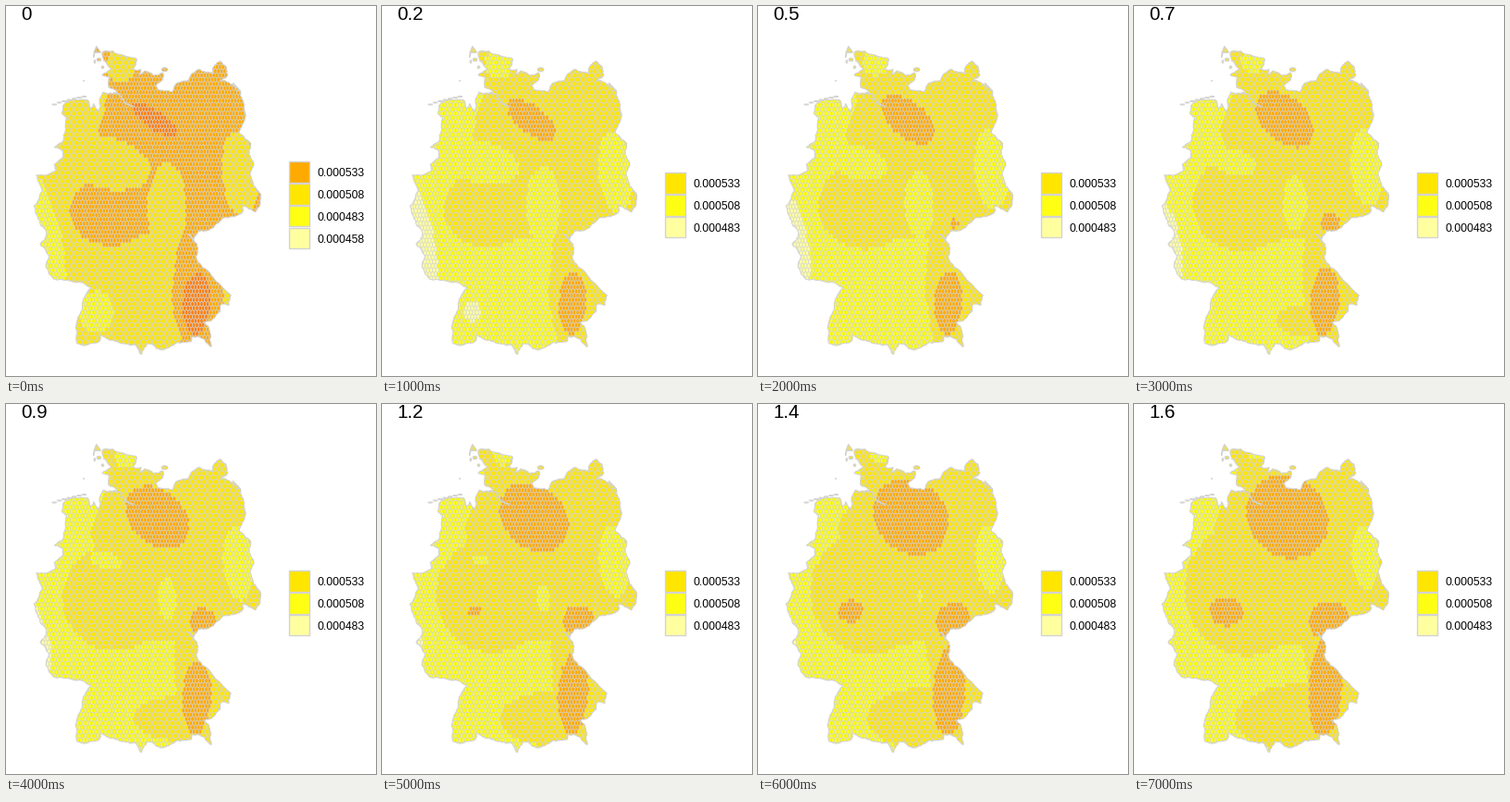
A matplotlib script for the animation above (8000 ms loop, 400x400 px).

```python
import numpy as np
import matplotlib.pyplot as plt
from matplotlib.animation import FuncAnimation
from matplotlib.collections import PolyCollection
from matplotlib.patches import PathPatch, Rectangle
from matplotlib.path import Path

SIZE, DPI, STEPS = 400, 100, 8
PX = 72 / DPI
GRAY = "#d3d3d3"
SHADES = np.array(["#ff7f0e", "#ffaa00", "#ffe600", "#ffff14", "#ffff9f"])
TOP_VALUE, VALUE_STEP = 0.000533, 0.000025
X_DEG, Y_DEG = 26.8, 42.9           # pixels per degree
CELL_W, ROW_H = 3.30, 4.577         # hexagon grid pitch

# Key points of the border of Germany (longitude, latitude), clockwise
COAST_EAST = [
    (8.66, 54.91), (9.44, 54.83), (10.03, 54.72), (9.85, 54.47), (10.2, 54.46),
    (10.14, 54.33), (10.35, 54.43), (10.7, 54.31), (11.08, 54.38), (11.08, 54.2),
    (10.77, 54.06), (10.88, 53.95), (11.45, 53.9), (11.6, 54.1), (12.1, 54.18),
    (12.53, 54.47), (13.1, 54.35), (13.15, 54.55), (13.4, 54.67), (13.6, 54.56),
    (13.7, 54.32), (13.4, 54.18), (13.75, 54.13), (14.2, 53.92),
]
INLAND_EAST = [
    (14.27, 53.72), (14.42, 53.3), (14.15, 52.85), (14.63, 52.59), (14.55, 52.42),
    (14.75, 52.05), (14.6, 51.82), (14.72, 51.56), (15.03, 51.27), (14.82, 50.87),
    (14.3, 51.04), (14.32, 50.9), (13.5, 50.72), (12.95, 50.42), (12.5, 50.38),
    (12.33, 50.19), (12.1, 50.31), (12.5, 49.96), (12.42, 49.75), (13.03, 49.28),
    (13.83, 48.77), (13.74, 48.52), (13.45, 48.56), (13.38, 48.36), (12.75, 48.1),
    (12.97, 47.88), (13.03, 47.47), (12.75, 47.67), (12.25, 47.72),
]
SOUTH_WEST = [
    (12.2, 47.6), (11.63, 47.58), (10.97, 47.4), (10.45, 47.56), (10.2, 47.28),
    (9.95, 47.53), (9.6, 47.54), (8.9, 47.65), (8.56, 47.79), (8.5, 47.6),
    (7.6, 47.57), (7.6, 48.1), (7.85, 48.62), (8.22, 48.97), (7.5, 49.1),
    (6.73, 49.17), (6.37, 49.47), (6.5, 49.75), (6.13, 50.05), (6.39, 50.33),
    (6.02, 50.76), (5.88, 51.03), (6.22, 51.4), (5.97, 51.8), (6.78, 51.92),
    (6.69, 52.07), (7.05, 52.25), (7.05, 52.38), (6.7, 52.5), (7.05, 52.65),
    (7.2, 53.25),
]
NORTH_SEA = [
    (7.0, 53.35), (7.05, 53.55), (7.25, 53.67), (8.05, 53.69), (8.15, 53.46),
    (8.28, 53.6), (8.5, 53.4), (8.52, 53.7), (8.65, 53.89), (9.25, 53.86),
    (8.88, 54.03), (8.92, 54.27), (8.63, 54.32), (9.0, 54.47), (8.65, 54.77),
]
ELBE = [(9.1, 53.88), (9.3, 53.85), (9.58, 53.6), (9.86, 53.54)]
SYLT = [(8.4, 55.05), (8.3, 54.9), (8.28, 54.76), (8.33, 54.88), (8.58, 54.89)]
USEDOM = [(13.9, 54.13), (14.2, 53.93), (14.05, 53.92)]

# Outline of the core class at the start and the end
CORE = np.array([(85, 70), (112, 88), (99, 142), (150, 246), (187, 248),
                 (178, 318), (193, 375), (300, 400), (300, 0), (85, 0)], float)
CORE_END = np.array([(85, 55), (112, 70), (85, 133), (110, 266), (180, 258),
                     (187, 285), (188, 375), (300, 400), (300, 0), (85, 0)], float)


def project(points):
    lon, lat = np.array(points).T
    return np.column_stack([30 + (lon - 5.87) * X_DEG, 43 + (55.06 - lat) * Y_DEG])


def roughen(points, rng, rounds=3):
    """Fractal border: push the middle of every edge sideways."""
    for _ in range(rounds):
        edge = np.roll(points, -1, axis=0) - points
        side = edge[:, ::-1] * (1, -1) * rng.uniform(-0.13, 0.13, (len(points), 1))
        points = np.stack([points, points + edge / 2 + side], axis=1).reshape(-1, 2)
    return points


def closed(points):
    return Path(np.vstack([points, points[:1]]), closed=True)


def islet(lon, lat, rx, ry):
    a = np.linspace(0, 2 * np.pi, 9)[:-1]
    return project(np.column_stack([lon + rx * np.cos(a), lat + ry * np.sin(a)]))


def make_islands():
    frisian = [islet(6.7 + 1.2 * f, 53.58 + 0.2 * f ** 0.8, 0.09, 0.012)
               for f in np.linspace(0, 1, 7)]
    others = [islet(8.5, 54.71, 0.09, 0.04), islet(8.33, 54.66, 0.03, 0.04),
              islet(8.65, 54.52, 0.05, 0.03), islet(11.15, 54.46, 0.13, 0.05),
              islet(7.89, 54.18, 0.02, 0.01)]
    return [project(SYLT), project(USEDOM)] + frisian + others


def hex_grid():
    """Centers anchored at the lower left corner of the map."""
    centers = np.array([(30 + CELL_W * (i + j % 2 / 2), 377 - ROW_H * j)
                        for j in range(-1, 75) for i in range(-1, 77)])
    shape = np.array([(0, -2), (1.5, -1), (1.5, 1), (0, 2), (-1.5, 1), (-1.5, -1)])
    return centers, shape * (CELL_W / 3, ROW_H / 3)


def mix(a, b, f):
    return np.array(a) + (np.array(b) - np.array(a)) * f


def oval(box, size=1.0, tilt=0):
    """Mask of the cells inside an ellipse given as (cx, cy, rx, ry)."""
    cx, cy, rx, ry = box
    if size <= 0:
        return np.zeros(len(centers), bool)
    x, y = (centers - (cx, cy)).T
    a = np.radians(tilt)
    u = x * np.cos(a) + y * np.sin(a)
    v = y * np.cos(a) - x * np.sin(a)
    return (u / rx) ** 2 + (v / ry) ** 2 < size ** 2


def grow(s, start):
    return np.sqrt(max(s - start, 0) / (1 - start))


def shrink(s, end, power=1.0):
    return max(1 - s / end, 0) ** power


def levels(s):
    """Class of every cell at progress s: 0 peak, 1 core, 2 base, 3 pale."""
    core = Path(mix(CORE, CORE_END, s)).contains_points(centers)
    core |= oval(mix((113, 222, 44, 37), (122, 200, 67, 72), s))
    core |= oval((185, 340, 75, 38), grow(s, 0.3))

    gap = oval((108, 169, 50, 28), shrink(s, 0.95, 1.2), 15)
    gap |= oval(mix((174, 218, 21, 48), (175, 207, 21, 48), s), shrink(s, 0.95, 0.8))
    gap |= oval(mix((253, 182, 19, 47), (250, 165, 15, 35), s), tilt=-5)
    gap |= oval(mix((125, 64, 16, 18), (133, 53, 9, 7), s))
    gap |= oval((246, 315, 11, 16), shrink(s, 0.1))

    pale = oval(mix((32, 244, 26, 82), (34, 256, 26, 82), s), shrink(s, 1.1), -15)
    pale |= oval((98, 330, 19, 22), shrink(s, 0.3))

    peak = oval(mix((161, 123, 29, 10), (166, 122, 47, 42), s), tilt=mix(36, 50, s))
    peak |= oval(mix((206, 322, 15, 33), (207, 305, 18, 55), s * s), tilt=3)
    peak |= oval((212, 235, 22, 22), grow(s, 0.25))
    peak |= oval((100, 224, 18, 16), grow(s, 0.66))

    level = np.full(len(centers), 2)
    level[core & ~gap] = 1
    level[pale] = 3
    level[peak] = 0
    return level


fig = plt.figure(figsize=(SIZE / DPI, SIZE / DPI), dpi=DPI, facecolor="white")
plt.rcParams["font.family"] = "Liberation Sans"
ax = fig.add_axes([0, 0, 1, 1])
ax.set(xlim=(0, SIZE), ylim=(SIZE, 0))
ax.axis("off")

rng = np.random.default_rng(4)
border = project(COAST_EAST + INLAND_EAST + SOUTH_WEST + NORTH_SEA)
land = Path.make_compound_path(closed(roughen(border, rng)),
                               *[closed(p) for p in make_islands()])

centers, shape = hex_grid()
cells = PolyCollection(centers[:, None] + shape, edgecolors=GRAY, linewidths=0.6 * PX)
ax.add_collection(cells)
cells.set_clip_path(land, ax.transData)
ax.add_patch(PathPatch(land, fill=False, ec=GRAY, lw=1.1 * PX))
ax.plot(*project(ELBE).T, color=GRAY, lw=1.6 * PX)

title = ax.text(16, 15.3, "", fontsize=20.5 * PX, va="baseline")
keys = [ax.add_patch(Rectangle((305.5, 0), 22.4, 22.4, ec=GRAY, lw=1.4 * PX))
        for _ in range(4)]
names = [ax.text(336.5, 0, f"{TOP_VALUE - i * VALUE_STEP:.6f}", fontsize=12.2 * PX,
                 va="baseline") for i in range(4)]


def draw(step):
    first = min(step, 1)  # the scale moves one shade up after the first step
    cells.set_facecolor(SHADES[levels(step / (STEPS - 1)) + first])
    title.set_text(f"{round(step * 0.7 / 3, 1):g}")
    count = 4 - first
    for i, (key, name) in enumerate(zip(keys, names)):
        y = 215.3 + (i - (count - 1) / 2) * 23.9
        key.set_y(y - 11.2)
        key.set_facecolor(SHADES[min(i + 1 + first, 4)])
        name.set_y(y + 4.4)
        key.set_visible(i < count)
        name.set_visible(i < count)
    return [cells, title, *keys, *names]


anim = FuncAnimation(fig, draw, frames=STEPS, interval=1000, repeat=True, repeat_delay=0)
plt.show()
```
